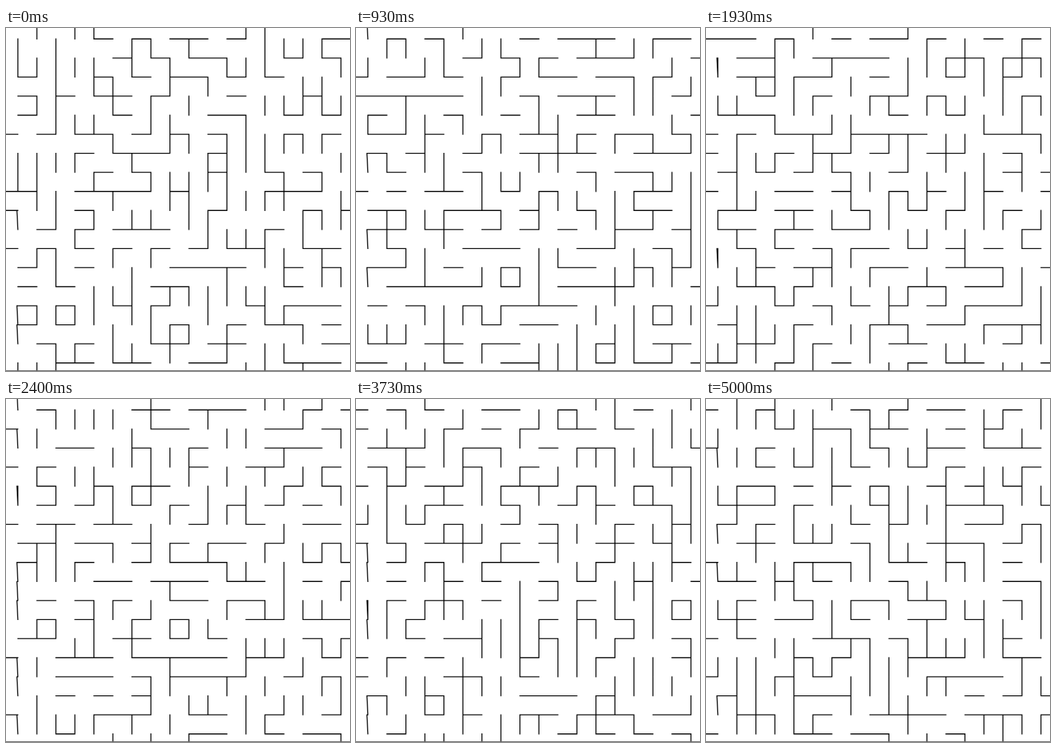
An HTML page with a canvas that plays this animation: 480x478 px, repeating every 5.07 s.

```html
<!DOCTYPE html>
<html lang="en">
<head>
<meta charset="utf-8">
<title>Toppling-pole maze</title>
<style>
  html, body { margin: 0; height: 100%; overflow: hidden; background: #fff; }
  canvas { display: block; }
</style>
</head>
<body>
<canvas id="stage" width="480" height="478"></canvas>
<script>
const ctx = document.getElementById('stage').getContext('2d');
const LOOP = 5070;
const CHANGES = [0, 400, 930, 1400, 1930, 2400, 2930, 3400, 3930, 4470, 5000];
const WIDTH = 362, HEIGHT = 360;
const POLES = 18, PITCH = 20;
const DIRECTIONS = [[0, -1], [1, 0], [0, 1], [-1, 0]];

const gridX = col => 12.5 + PITCH * col;
const gridY = row => 11.5 + PITCH * row;

function seededRandom(seed) {
  return () => {
    seed = (seed + 0x6D2B79F5) | 0;
    let t = Math.imul(seed ^ (seed >>> 15), 1 | seed);
    t = (t + Math.imul(t ^ (t >>> 7), 61 | t)) ^ t;
    return ((t ^ (t >>> 14)) >>> 0) / 4294967296;
  };
}

// Every pole falls onto one of its four neighbours.
function drawMaze(index) {
  const random = seededRandom(index * 7919 + 17);
  ctx.setTransform(480 / WIDTH, 0, 0, 478 / HEIGHT, 0, 0);
  ctx.fillStyle = '#fff';
  ctx.fillRect(0, 0, WIDTH, HEIGHT);
  ctx.strokeStyle = '#000';
  ctx.lineWidth = 1;
  ctx.lineCap = 'square';
  ctx.beginPath();
  for (let row = 0; row < POLES; row++) {
    for (let col = 0; col < POLES; col++) {
      const [dx, dy] = DIRECTIONS[Math.floor(random() * 4)];
      // Upward walls in the first column lean slightly to the left.
      const lean = col === 0 && dy < 0 ? 1 : 0;
      ctx.moveTo(gridX(col), gridY(row));
      ctx.lineTo(gridX(col + dx) - lean, gridY(row + dy));
    }
  }
  ctx.stroke();
  ctx.fillStyle = '#666';
  ctx.fillRect(0, HEIGHT - 0.75, WIDTH, 0.75);
}

let shown = -1;
function tick() {
  const time = performance.now() % LOOP;
  const index = CHANGES.filter(start => start <= time).length - 1;
  if (index !== shown) drawMaze(shown = index);
  requestAnimationFrame(tick);
}
tick();
</script>
</body>
</html>
```
